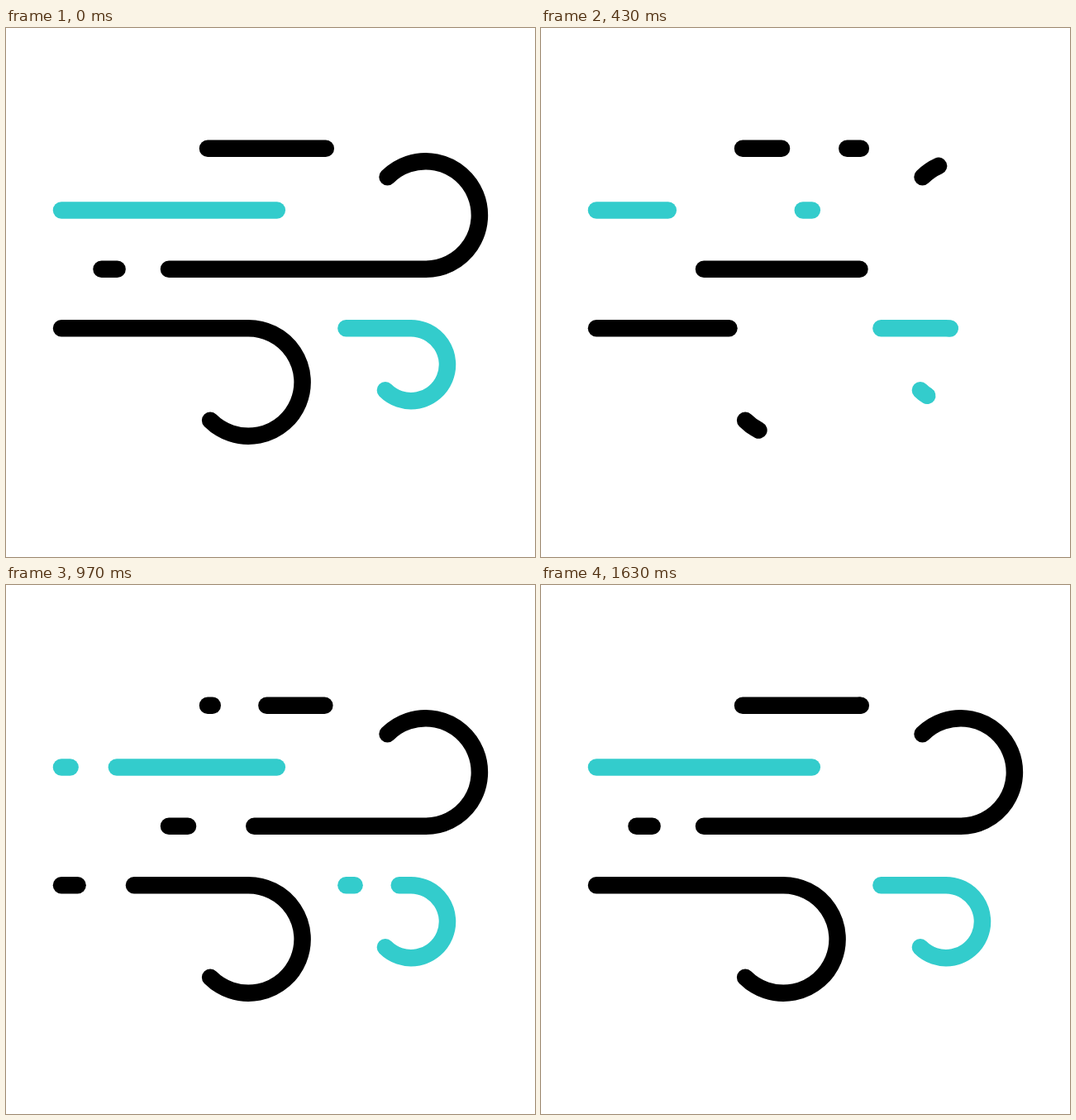
These frames come from a looping animation (640x640 px, 1.67 s). An HTML page:

```html
<!DOCTYPE html>
<html lang="en">
<head>
<meta charset="utf-8">
<title>Wind</title>
<style>
  html, body { margin: 0; width: 100%; height: 100%; overflow: hidden; background: #fff; }
  svg { display: block; width: 100%; height: 100%; }
  path { fill: none; stroke: #000; stroke-width: 20.5; stroke-linecap: round; }
  .teal { stroke: #3cc; }
</style>
</head>
<body>
<svg viewBox="0 0 640 640"></svg>
<script>
  const LOOP = 1670, TICKS = 50;
  const svg = document.querySelector('svg');

  // Times are in ticks; each gust is drawn in from its start, then erased from its start.
  const DRAW = [[3, 27], [25, 49]];
  const gusts = [
    { d: 'M244 145.7H386.8', erase: [[0, 16], [21, 37]], draw: DRAW, reach: 0.99, tailFrom: 37 },
    { d: 'M67 220.4H327.8', erase: [[0, 14.5], [24, 40]], draw: DRAW, teal: true },
    { d: 'M115.5 291.8H134.6', erase: [[0, 6], [22.5, 28.5]], draw: [[14, 22.4], [33, 41.5]], drawPull: 0.333 },
    { d: 'M197 291.8H507.7' + curl(507.7, 226.4, 65.3, -1), erase: [[0, 14.5], [25, 41]], draw: DRAW },
    { d: 'M67 363.2H293.3' + curl(293.3, 428.5, 65.3, 1), erase: [[0, 14.5], [25, 41]], draw: DRAW },
    { d: 'M411.4 363.2H490' + curl(490, 407.2, 44, 1), erase: [[0, 14.5], [24, 40]], draw: DRAW, teal: true }
  ];

  // A 225 degree arc; side 1 curls downwards, -1 upwards.
  function curl(cx, cy, r, side) {
    const k = r * Math.SQRT1_2;
    return `A${r} ${r} 0 1 ${side > 0 ? 1 : 0} ${cx - k} ${cy + side * k}`;
  }

  // Symmetric cubic ease with handles at (pull, 0) and (1 - pull, 1).
  function ease(tick, [from, to], pull) {
    const t = (tick - from) / (to - from);
    if (t <= 0) return 0;
    if (t >= 1) return 1;
    let lo = 0, hi = 1;
    for (let i = 0; i < 30; i++) {
      const s = (lo + hi) / 2, r = 1 - s;
      const x = 3 * r * r * s * pull + 3 * r * s * s * (1 - pull) + s * s * s;
      if (x < t) lo = s; else hi = s;
    }
    return lo * lo * (3 - 2 * lo);
  }

  function addPath(gust) {
    const path = document.createElementNS('http://www.w3.org/2000/svg', 'path');
    path.setAttribute('d', gust.d);
    path.setAttribute('pathLength', 1);
    if (gust.teal) path.classList.add('teal');
    return svg.appendChild(path);
  }

  function trim(path, start, end) {
    const visible = end - start > 1e-5;
    path.style.display = visible ? '' : 'none';
    if (!visible) return;
    path.setAttribute('stroke-dasharray', `${end - start} 3`);
    path.setAttribute('stroke-dashoffset', -start);
  }

  for (const gust of gusts) {
    gust.strokes = [0, 1, 2].map(() => addPath(gust));
    if (gust.tailFrom) gust.tail = addPath(gust);
  }

  function render(tick) {
    for (const { strokes, erase, draw, drawPull = 0.52, reach = 1, tail, tailFrom } of gusts) {
      const erased = erase.map(span => ease(tick, span, 0.25));
      const drawn = draw.map(span => reach * ease(tick, span, drawPull));
      trim(strokes[0], erased[0], 1);
      trim(strokes[1], erased[1], drawn[0]);
      trim(strokes[2], 0, drawn[1]);
      if (tail) trim(tail, reach, tick >= tailFrom ? 1 : 0);
    }
  }

  const began = performance.now();
  function loop() {
    const time = (performance.now() - began) % LOOP;
    render(Math.min(TICKS - 1, Math.floor((time + 3.4) * 0.03)));
    requestAnimationFrame(loop);
  }
  loop();
</script>
</body>
</html>
```
